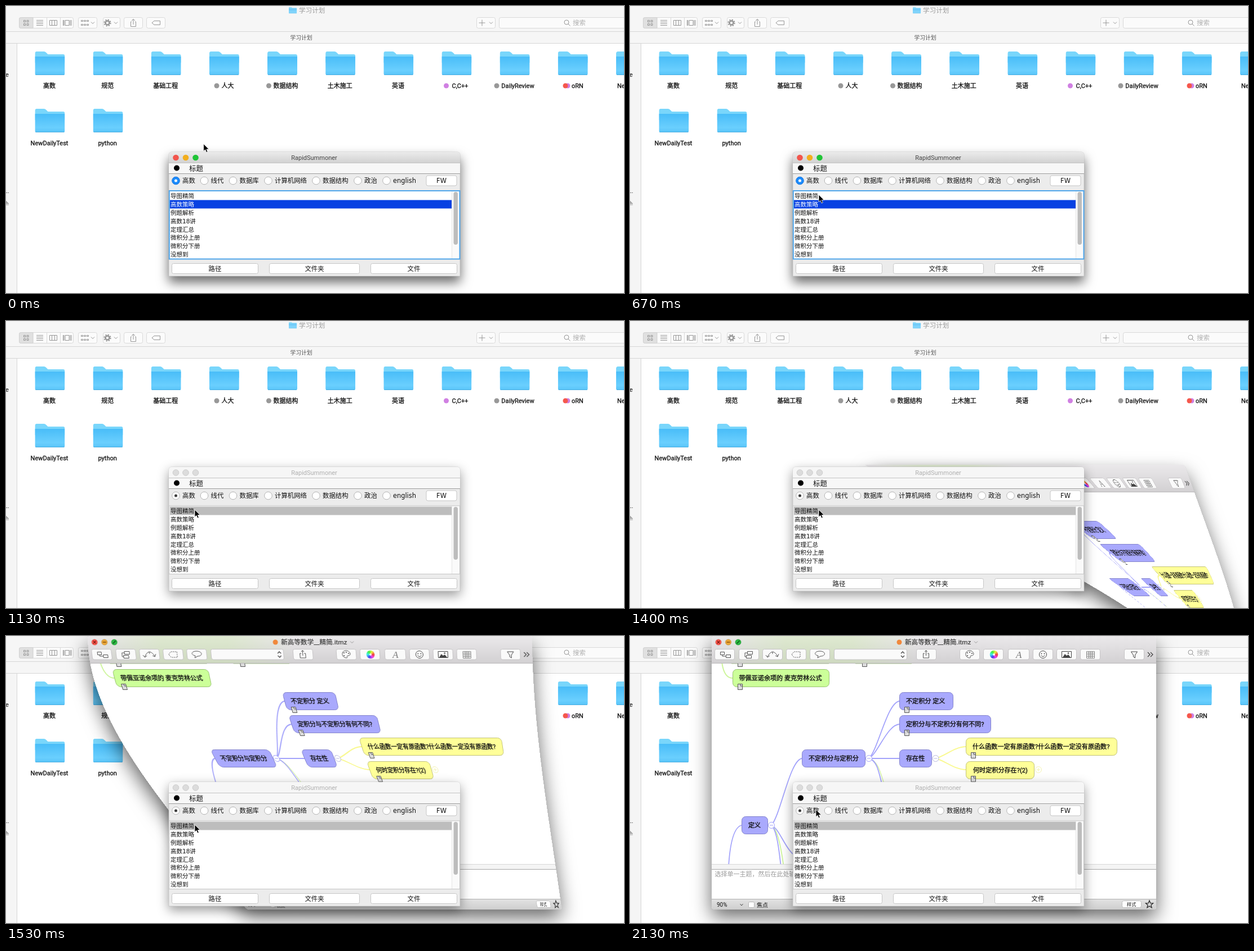
An HTML page with a canvas for the animation above (2200 ms loop, 1097 by 511 pixels).

```html
<!DOCTYPE html>
<html lang="zh-CN">
<head>
<meta charset="utf-8">
<title>Launcher</title>
<style>
html, body { margin: 0; width: 100%; height: 100%; overflow: hidden; background: #fff; }
svg, canvas { position: absolute; left: 0; top: 0; width: 1097px; height: 511px; }
text { font: 11px Roboto, "Noto Sans CJK SC", "Noto Sans CJK", sans-serif; fill: #111; }
.mid { text-anchor: middle; }
#files text { stroke: #111; stroke-width: .3; }
.btn { fill: #fbfbfb; stroke: #d9d9d9; }
.ico { fill: none; stroke: #969696; }
.pale { fill: #9a9a9a; }
#launcher text { font-family: "DejaVu Sans", "Noto Sans CJK SC", "Noto Sans CJK", sans-serif; font-size: 11.4px; }
#launcher .name { font: 11px Roboto, sans-serif; fill: #444; }
#launcher .row { font-size: 10.5px; }
#launcher .row.on { fill: #fff; }
#shade { filter: drop-shadow(0 11px 10px rgba(0,0,0,.58)); }
.push { fill: #fff; stroke: #c6c6c6; }
.radio { fill: #fff; stroke: #b4b4b4; }
.radio.on { fill: #1c8bfb; stroke: #1676e0; }
#dot { fill: #fff; }
#bar { fill: #0741e2; }
#ring { fill: none; stroke: #4fa5ea; stroke-width: 2; }
.off #shade { filter: drop-shadow(0 7px 10px rgba(0,0,0,.4)); }
.off #head { fill: #f6f6f6; }
#launcher.off .name { fill: #b0b0b0; }
.off .light { fill: #dcdcdc; stroke: #cdcdcd; }
.off .radio.on { fill: #fff; stroke: #b4b4b4; }
.off #dot { fill: #3c3c3c; }
.off #bar { fill: #bdbdbd; }
.off #ring { stroke: #c4c4c4; stroke-width: 1; }
#launcher.off .row.on { fill: #111; }
</style>
</head>
<body>
<svg id="finder" viewBox="0 0 1097 511">
  <defs>
    <linearGradient id="front" x2="0" y2="1">
      <stop stop-color="#49bdf8"/><stop offset=".75" stop-color="#6acffe"/><stop offset="1" stop-color="#58c4f8"/>
    </linearGradient>
    <symbol id="folder" viewBox="0 0 53 43" width="53" height="43">
      <path d="M0 4Q0 0 3 0H16Q18 0 20 2L23 5H50Q53 5 53 8V20H0Z" fill="#79d6fb"/>
      <path d="M0 9H53V39Q53 42 50 42H3Q0 42 0 39Z" fill="url(#front)"/>
      <path d="M1 41.5H52" stroke="#4aaee2"/>
    </symbol>
  </defs>
  <rect width="1097" height="66" fill="#f6f6f6"/>
  <rect y="67" width="19" height="444" fill="#f5f5f5"/>
  <path d="M0 45.5H1097M0 66.5H1097M19.5 67V511" stroke="#d6d6d6"/>
  <use href="#folder" transform="translate(502 2) scale(.27)" opacity=".8"/>
  <text class="pale" x="520" y="12.4" style="font-size:11.6px">学习计划</text>
  <text class="mid" x="524" y="59.7" style="font-size:9.8px;fill:#555">学习计划</text>
  <text x="-1" y="126">e</text><text x="-3" y="333">...</text>
  <path d="M-5 352L0 347L5 352ZM-5 354H5" fill="#aaa" stroke="#aaa"/>
  <g id="tools"></g>
  <path d="M23.5 23.5Q23.5 20.5 26.5 20.5H48V39.5H26.5Q23.5 39.5 23.5 36.5Z" fill="#e0e0e0" stroke="#d0d0d0"/>
  <path d="M72.5 20V39M96.5 20V39" stroke="#d9d9d9"/>
  <g class="ico">
    <path d="M31.5 25.5h3v3h-3zM37 25.5h3v3h-3zM31.5 31.5h3v3h-3zM37 31.5h3v3h-3zM54 25.5H66M54 28.5H66M54 31.5H66M54 34.5H66M77.5 25.5h13v9h-13zM81.5 26v8M86.5 26v8M105 25.5h7v9h-7zM101.5 25v10M103 25v10M114 25v10M116 25v10"/>
    <path d="M133.5 25.5h3v2h-3zM138.5 25.5h3v2h-3zM143.5 25.5h3v2h-3zM133.5 32.5h3v2h-3zM138.5 32.5h3v2h-3zM143.5 32.5h3v2h-3z"/>
    <path d="M151 28.5L154 31.5L157 28.5M192 28.5L195 31.5L198 28.5M858 28.5L861 31.5L864 28.5M839.5 30H850.5M845 24.5V35.5"/>
    <circle cx="180" cy="30" r="3.5" stroke-width="2.5"/>
    <circle cx="180" cy="30" r="5.6" stroke-width="2" stroke-dasharray="2.2"/>
    <path d="M223 28H221.5V36.5H230.5V28H229M226 33V23.5M223 26L226 23.5L229 26M259 30L263 26.5H273.5V33.5H263Z"/>
    <circle cx="995" cy="29" r="4"/><path d="M998 32L1001.5 35.5"/>
  </g>
  <text x="1006" y="34" style="font-size:11.5px;fill:#b0b0b0">搜索</text>
  <g id="files"></g>
</svg>

<canvas id="stage"></canvas>

<svg id="launcher" viewBox="0 0 1097 511">
  <defs>
    <linearGradient id="grey" x2="0" y2="1"><stop stop-color="#ebebeb"/><stop offset="1" stop-color="#d2d2d2"/></linearGradient>
  </defs>
  <path id="shade" d="M289 481V265Q289 260 294 260H801Q806 260 806 265V481Z" fill="#ececec" stroke="#bbb" stroke-width=".6"/>
  <path id="head" d="M289 279V265Q289 260 294 260H801Q806 260 806 265V279Z" fill="url(#grey)"/>
  <circle class="light" cx="301.5" cy="270" r="5.3" fill="#f2564d"/>
  <circle class="light" cx="319" cy="270" r="5.3" fill="#f2ae1e"/>
  <circle class="light" cx="336.5" cy="270" r="5.3" fill="#20c437"/>
  <text class="name mid" x="547" y="274">RapidSummoner</text>
  <rect x="289" y="279" width="517" height="19" fill="#f7f7f7"/>
  <path d="M289 279.5H806" stroke="#c4c4c4"/><path d="M289 298.5H806" stroke="#9c9c9c"/>
  <circle cx="303" cy="288.5" r="5"/>
  <text x="325" y="293.7" style="font-size:12.5px">标题</text>
  <g id="radios"></g>
  <circle id="dot" cx="301.5" cy="311" r="2.5"/>
  <rect x="289" y="329" width="517" height="121" fill="#fff"/>
  <rect id="bar" x="291" width="500" height="15"/>
  <g id="rows"></g>
  <path d="M791.5 330V450" stroke="#e4e4e4"/>
  <rect x="792" y="330" width="13" height="120" fill="#fafafa"/>
  <rect x="794.5" y="331" width="7.5" height="94" rx="3.7" fill="#bdbdbd"/>
  <rect id="ring" x="289.8" y="329" width="515.7" height="121.5"/>
  <g id="pushes"></g>
  <path id="cursor" d="M0 0V13L3 10.3L5 15L7.3 14L5.3 9.6H9.5Z" stroke="#fff" stroke-width=".8"/>
</svg>

<script>
const $ = id => document.getElementById(id);
const smooth = t => t <= 0 ? 0 : t >= 1 ? 1 : t * t * (3 - 2 * t);
const FONT = 'Roboto,"Noto Sans CJK SC","Noto Sans CJK",sans-serif';

// Static pieces of the two flat layers
$('tools').innerHTML = [[23, 97], [128, 34], [172, 31], [209, 34], [249, 34], [835, 34], [875, 240]]
  .map(([x, w]) => `<rect class="btn" x="${x + .5}" y="20.5" width="${w - 1}" height="19" rx="3"/>`).join('');

const GREY = '#989898', PINK = '#d080e2', RED = '#f5574c';
const files = [['高数'], ['规范'], ['基础工程'], ['人大', GREY], ['数据结构', GREY], ['土木施工'], ['英语'],
  ['C,C++', PINK], ['DailyReview', GREY], ['oRN', PINK, RED], ['New'], ['NewDailyTest'], ['python']];
const tagText = { 3: 393.5, 4: 496.5, 7: 806, 8: 908.5, 9: 1014.5, 10: 1096 };
const tagDot = { 3: 374, 4: 466.5, 7: 781.5, 8: 871, 9: 997 };
$('files').innerHTML = files.map(([name, ...tags], i) => {
  const col = i % 11, x = 77.7 + col * 103.15, y = i > 10 ? 183 : 81;
  const dots = tags.map((c, j) => `<circle cx="${tagDot[i] - 4 * j}" cy="142" r="4.5" fill="${c}"/>`).join('');
  return `<use href="#folder" x="${x - 26.3}" y="${y}"/>${dots}
    <text class="mid" x="${tagText[i] || x - .7}" y="${y + 65}">${name}</text>`;
}).join('');

const radios = [['高数', 301.5], ['线代', 352], ['数据库', 403], ['计算机网络', 465.5],
  ['数据结构', 550.5], ['政治', 624.5], ['english', 675.5]];
$('radios').innerHTML = radios.map(([name, x], i) =>
  `<circle class="radio${i ? '' : ' on'}" cx="${x}" cy="311" r="6.8"/><text x="${x + 11.5}" y="315.3">${name}</text>`).join('');

$('rows').innerHTML = ['导图精简', '高数策略', '例题解析', '高数18讲', '定理汇总', '微积分上册', '微积分下册', '没想到']
  .map((s, i) => `<text class="row" x="292" y="${341.9 + i * 14.9}">${s}</text>`).join('');
const rows = [...document.querySelectorAll('.row')];

$('pushes').innerHTML = [['FW', 746, 302, 54], ['路径', 294.5, 458.5, 153], ['文件夹', 467.5, 458.5, 160], ['文件', 647.5, 458.5, 153]]
  .map(([s, x, y, w]) => `<rect class="push" x="${x}" y="${y}" width="${w}" height="18" rx="3"/>
    <text class="mid" x="${x + w / 2}" y="${y + 13.2}">${s}</text>`).join('');

// Mind map window, drawn flat once
const LEFT = 145, RIGHT = 934, WIDE = RIGHT - LEFT, TALL = 487;
const dpr = window.devicePixelRatio || 1;
const stage = $('stage'), flat = document.createElement('canvas');
stage.width = 1097 * dpr; stage.height = 511 * dpr;
flat.width = WIDE * dpr; flat.height = TALL * dpr;
const out = stage.getContext('2d'), c = flat.getContext('2d');

function line(d, color = '#555', width = 1) {
  c.strokeStyle = color; c.lineWidth = width; c.stroke(new Path2D(d));
}
function box(x, y, w, h, r, fill, edge) {
  c.beginPath(); c.roundRect(x, y, w, h, r);
  c.fillStyle = fill; c.fill();
  if (edge) { c.strokeStyle = edge; c.lineWidth = 1; c.stroke(); }
}
function disc(x, y, r, fill, edge) { box(x - r, y - r, 2 * r, 2 * r, r, fill, edge); }
function label(s, x, y, size = 11, color = '#111', bold = 0) {
  c.font = `${size}px ${FONT}`; c.fillStyle = color; c.fillText(s, x, y);
  if (bold) { c.strokeStyle = color; c.lineWidth = bold; c.strokeText(s, x, y); }
}
function shade(y, h, a, b) {
  const g = c.createLinearGradient(0, y, 0, y + h);
  g.addColorStop(0, a); g.addColorStop(1, b);
  c.fillStyle = g; c.fillRect(LEFT, y, WIDE, h);
}
function note(x, y) {
  box(x + .5, y + .5, 8, 10, 0, '#dcdcdc', '#555');
  line(`M${x + 5} ${y + .5}V${y + 4}H${x + 8.5}`, '#555');
}
function node(s, x, y, w, fill, edge, tx = x + 11.5, hasNote) {
  box(x + .5, y + .5, w, 31, 7, fill, edge);
  label(s, tx, y + 20, 11.1, '#111', .35);
  if (hasNote) note(x + 9, y + 26);
}
// Branch that leaves at a slant and arrives horizontally
function branch(x, y, x2, y2, color, width = 1.8) {
  const w = x2 - x;
  line(`M${x} ${y}C${x + .3 * w} ${y + .15 * (y2 - y)} ${x2 - .4 * w} ${y2} ${x2} ${y2}`, color, width);
}
function knob(x, y, color, plus) {
  disc(x, y, 5.5, '#fff', color);
  line(`M${x - 3} ${y}h6${plus ? `M${x} ${y - 3}v6` : ''}`, color);
}

function drawBar() {
  shade(0, 48, '#ebe9eb', '#d3d1d3');
  // green nodes glimmer through the translucent bar
  const glow = c.createLinearGradient(160, 0, 510, 0);
  ['0', '.3', '.3', '0'].forEach((a, i) => glow.addColorStop(i / 3, `rgba(196,236,150,${a})`));
  c.fillStyle = glow; c.fillRect(160, 0, 350, 48);
  [['#fb5a50', 157], ['#e9a63a', 174.5], ['#2eb844', 192]].forEach(([f, x]) => disc(x, 11, 5.3, f, 'rgba(0,0,0,.12)'));
  line('M154.5 8.5l5 5m0-5l-5 5', '#7a1511', 1.2);
  line('M171.5 11h6', '#8a5208', 1.3);
  line('M189.5 13.5l5-5', '#0b5c17', 1.6);
  disc(478, 11, 4.5, '#f0883c');
  label('新高等数学__精简.itmz', 488, 15, 11.6, '#333', .2);
  line('M611 9.5l3 3l3-3', '#999');
  [[150, 36], [193, 36], [235, 36], [277, 36], [319, 36], [362, 130], [508, 36], [585, 36], [627, 36],
    [671, 38], [715, 36], [757, 36], [799, 36], [877, 36]]
    .forEach(([x, w]) => box(x + .5, 23.5, w - 1, 18.5, 3, '#fafafa', '#c6c4c6'));
  line('M160.5 28.5h7v5h-7zM170.5 33.5h8v5h-8zM164 34v2h6');
  line('M208.5 27.5h9v5h-9zM206.5 34.5h9v5h-9zM208 30h-4v7h2');
  line('M244 37Q253 20 262 36M241 34l3 4l4-3M258 35l4 2l2-5M253 28v4');
  c.setLineDash([2, 1.5]);
  line('M287 33l4-5h11v10h-11z');
  c.setLineDash([]);
  line('M334 35C326 34 327 27 337 27C348 27 348 36 338 36L333 39Z');
  line('M481 31l3-3l3 3M481 35l3 3l3-3', '#444', 1.3);
  line('M523 31h-2.5v8h10v-8h-2.5M525.5 35v-9M523 28l2.5-2.5l2.5 2.5');
  line('M603 26C593 26 594 39 603 39C606 39 602 35 606 35C613 35 610 26 603 26Z');
  [[599, 30], [603, 29], [607, 31], [599, 35]].forEach(([x, y]) => disc(x, y, 1.1, '#555'));
  const wheel = c.createConicGradient(0, 646, 33);
  for (let i = 0; i <= 6; i++) wheel.addColorStop(i / 6, `hsl(${360 - i * 60} 85% 60%)`);
  disc(646, 33, 7.3, wheel); disc(646, 33, 2, '#fff');
  c.font = 'italic 17px "Liberation Serif", serif';
  c.fillStyle = '#777'; c.fillText('A', 685, 38.5);
  disc(733, 33, 6.5, '#fff', '#444');
  disc(730.5, 31.5, 1, '#444'); disc(735.5, 31.5, 1, '#444');
  line('M729.5 34.5q3.5 4 7 0', '#444');
  line('M766.5 27.5h17v11h-17z', '#444');
  c.fillStyle = '#444'; c.fill(new Path2D('M768 38l4-6l3 3l3-2l4 5z')); disc(778, 30.5, 1.2, '#444');
  line('M810.5 27.5h14v12h-14zM811 30.5h13M811 33.5h13M811 36.5h13M814.5 28v11M817.5 28v11M820.5 28v11', '#888');
  line('M889.5 28h11l-4 6v5l-3-2v-3z', '#444');
  line('M919 29l4 4l-4 4M924 29l4 4l-4 4', '#444', 1.3);
  line('M145 48.5H935', '#b8b6b8');
}

function drawMap() {
  const blue = '#a9a9fd', blueEdge = '#8484cc', lime = '#ccff99', limeEdge = '#98c272', sun = '#ffff99', sunEdge = '#c2c277';
  const wire = '#a3a3fb', gold = '#f9f98e';
  c.save();
  c.beginPath(); c.rect(LEFT, 49, WIDE, 357); c.clip();
  line('M180 49H353M400 49H500', limeEdge);
  line('M163 46C165 62 170 75 182 75', '#cdf59b', 2);
  note(191, 44); note(412, 44);
  branch(424, 218, 479, 116, wire); branch(424, 218, 479, 157, wire); branch(424, 218, 479, 218, wire);
  line('M424 218C443 222 446 250 462 300', '#d5f3a8', 1.5);
  line('M424 218C441 222 442 248 454 290', wire, 1.8);
  branch(251, 337, 306, 218, wire);
  line('M198 337C182 341 177 378 175 410', wire, 1.8);
  line('M251 337C262 345 268 375 273 412', '#cdf59b', 1.8);
  line('M251 337C260 345 264 375 268 412M251 337C268 345 275 384 300 396', wire, 1.8);
  branch(542, 218, 597, 197, gold); branch(542, 218, 597, 238, gold);
  node('带佩亚诺余项的 麦克劳林公式', 182, 59, 171, lime, limeEdge, 193.5, true);
  node('不定积分 定义', 478, 100, 95, blue, blueEdge, 490, true);
  node('定积分与不定积分有何不同?', 478, 141, 162, blue, blueEdge, 490, true);
  node('不定积分与定积分', 305, 202, 112, blue, blueEdge, 317);
  node('存在性', 478, 202, 57, blue, blueEdge, 490);
  node('定义', 198, 321, 46, blue, blueEdge, 210);
  node('什么函数一定有原函数?什么函数一定没有原函数?', 596, 181, 268, sun, sunEdge, 608, true);
  node('何时定积分存在?(2)', 596, 223, 121, sun, sunEdge, 609, true);
  knob(424, 218, wire); knob(251, 337, wire); knob(542.5, 218, '#b5b5dd'); knob(725, 238, '#f3f3b0', true);
  c.restore();
}

function drawFoot() {
  c.fillStyle = '#f4f4f4'; c.fillRect(LEFT, 406, WIDE, 10);
  line('M145 406.5H935', '#d8d8d8'); line('M145 415.5H935', '#a8a8a8');
  label('选择单一主题，然后在此处输入', 150.5, 428, 11, '#9b9b9b');
  shade(468, 20, '#e3e3e3', '#cdcdcd');
  line('M145 468.5H935', '#b0b0b0');
  label('90%', 154, 482, 10);
  line('M195.5 477l2.5 3l2.5-3', '#444');
  box(210.5, 473.5, 10, 10, 2, '#fff', '#b5b5b5');
  label('焦点', 225, 482.5, 10);
  box(873.5, 471.5, 34, 12, 3, '#fff', '#bcbcbc');
  label('样式', 882, 480.7, 8.2);
  let star = '';
  for (let i = 0; i < 10; i++) {
    const r = i % 2 ? 3 : 7, a = (i / 5 - .5) * Math.PI;
    star += `${i ? 'L' : 'M'}${922 + r * Math.cos(a)} ${478 + r * Math.sin(a)}`;
  }
  line(star + 'Z', '#222', 1.2);
}

c.scale(dpr, dpr);
c.translate(-LEFT, 0);
c.beginPath(); c.roundRect(LEFT, 0, WIDE, TALL, [4, 4, 5, 5]); c.clip();
c.fillStyle = '#fff'; c.fillRect(LEFT, 0, WIDE, TALL);
drawBar(); drawMap(); drawFoot();

// Genie: each row is squeezed between two curves that run down to the dock
function drawWindow(drop, bend) {
  out.setTransform(dpr, 0, 0, dpr, 0, 0);
  out.clearRect(0, 0, 1097, 511);
  const reach = 700 + 150 * (1 - bend);
  const edges = y => {
    const s = bend * smooth(y / reach);
    return [LEFT + 900 * s, RIGHT + 168 * s];
  };
  const last = drop + TALL;
  out.save();
  out.beginPath();
  for (let y = drop; y < last; y += 4) out.lineTo(edges(y)[0], y + .5);
  for (let y = last - 1; y >= drop; y -= 4) out.lineTo(edges(y)[1], y);
  out.closePath();
  out.shadowColor = 'rgba(0,0,0,.6)';
  out.shadowBlur = 34 * dpr; out.shadowOffsetY = 15 * dpr;
  out.fillStyle = '#d0d0d0'; out.fill();
  out.restore();
  for (let i = 0; i < TALL && drop + i < 511; i++) {
    const [l, r] = edges(drop + i);
    out.drawImage(flat, 0, i * dpr, flat.width, dpr, l, drop + i, r - l, 1);
  }
}

function pointer(n) {
  const p = Math.min(1, Math.max(0, (n - 2) / 8)), q = smooth((n - 27) / 5);
  return [350.7 - 15.7 * p ** 2.5 - 5 * q, 245.5 + 90.5 * (1 - (1 - p) ** 2.25) - 27 * q];
}

// The picture advances 15 times a second, 33 steps per loop
let shown = -1;
function show(n) {
  const chosen = n < 15 ? 1 : 0;
  $('launcher').classList.toggle('off', n >= 17);
  $('bar').setAttribute('y', 330.5 + 15 * chosen);
  rows.forEach((r, i) => r.classList.toggle('on', i === chosen));
  $('cursor').setAttribute('transform', `translate(${pointer(n)})`);
  stage.style.display = n < 20 ? 'none' : '';
  if (n >= 20) drawWindow(Math.round(700 * Math.max(0, (23 - n) / 4) ** 1.45), smooth((24.8 - n) / 3.8));
}
const begin = performance.now();
function tick(now) {
  const t = Math.max(0, now - begin) % 2200;
  const n = Math.floor((t + 4) * 3 / 200) % 33;
  if (n !== shown) show(shown = n);
  requestAnimationFrame(tick);
}
show(0);
requestAnimationFrame(tick);
</script>
</body>
</html>
```
